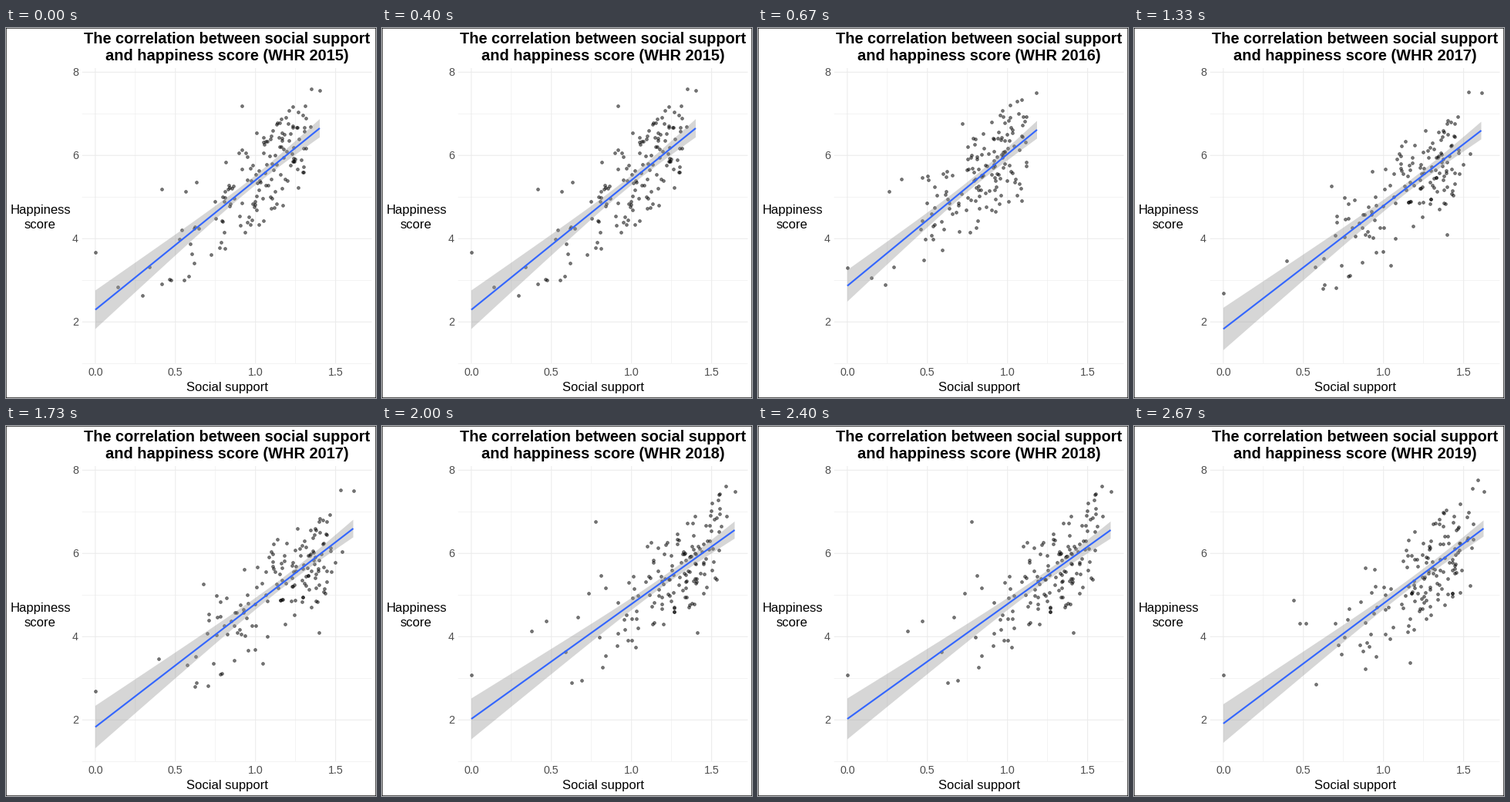
A matplotlib script for the animation above (3330 ms loop, 480x480 px).

```python
import numpy as np
import matplotlib.pyplot as plt
from matplotlib.animation import FuncAnimation

SIZE, DPI = 480, 100
PT = 72 / DPI                       # points per pixel
LOOP, TICK = 3330, 10               # milliseconds
CHANGES = (670, 1330, 2000, 2670)   # when the next year appears
LEFT, RIGHT, TOP, BOTTOM = 98.8, 474.5, 52, 435
X0, UNIT_X = 115.9, 207.8           # zero support, pixels per unit
Y8, UNIT_Y = 57.3, 54               # score eight, pixels per point
COUNT = 156                         # countries per year

plt.rcParams["font.family"] = "Liberation Sans"


class Year:
    """Scatter, regression line and confidence band of one year, in pixels."""

    def __init__(self, label, end, line, mean, edge, marks):
        self.label, self.end, self.line = label, end, line
        self.mean, self.edge = mean, edge
        self.points = np.vstack([marks, self.cloud(COUNT - len(marks))])

    def fit(self, x):
        return np.interp(x, (X0, self.end), self.line)

    def cloud(self, count):
        """Countries crowd towards high support and thin out to the left."""
        rng = np.random.default_rng(self.label)
        span = self.end - X0
        high = X0 + 0.97 * span
        x = high - rng.gamma(2, (high - self.mean) / 2, count)
        x = np.maximum(x, X0 + span * rng.uniform(0.2, 0.6, count))
        spread = np.clip(rng.normal(0, 1, count), -1.6, 1.6)
        spread += rng.uniform(-0.15, 0.15, count)
        return np.column_stack([x, self.fit(x) + 36 * spread])

    def ribbon(self):
        narrow = 6.4
        slope2 = (self.edge**2 - narrow**2) / (self.mean - X0) ** 2
        x = np.linspace(X0, self.end, 80)
        half = np.sqrt(narrow**2 + slope2 * (x - self.mean) ** 2)
        y = self.fit(x)
        return np.vstack([np.column_stack([x, y - half]),
                          np.column_stack([x, y + half])[::-1]])


# Only the countries that stand apart are placed by hand.
YEARS = [
    Year(2015, 407, (365.5, 130), 322, 25,
         [(116, 290.5), (145, 336), (202, 209), (202, 332), (214, 327),
          (306, 101), (396, 79), (407, 81)]),
    Year(2016, 362, (334.5, 132), 281, 20.5,
         [(116, 311), (147, 323.5), (165, 332.5), (170, 212), (186, 196),
          (265, 124), (342, 224), (361, 84)]),
    Year(2017, 450.5, (390.5, 133), 363, 27.5,
         [(116, 344), (198, 302), (247, 332.5), (256, 205), (333, 308),
          (406, 268), (434, 83), (451, 84)]),
    Year(2018, 457.5, (380, 135), 368, 26.5,
         [(116, 323), (194, 266), (246, 332.5), (277, 124), (284, 194),
          (409, 268), (446, 78), (457.5, 85)]),
    Year(2019, 453.5, (386, 133), 367, 25,
         [(116, 323), (207, 226), (236, 335), (300, 184), (300, 315),
          (358, 307), (446, 70), (453.5, 85)]),
]

fig = plt.figure(figsize=(SIZE / DPI, SIZE / DPI), dpi=DPI, facecolor="white")
ax = fig.add_axes([0, 0, 1, 1])
ax.set(xlim=(0, SIZE), ylim=(SIZE, 0))
ax.axis("off")


def text(x, y, string, px, ha="center", **style):
    return ax.text(x, y, string, fontsize=px * PT, ha=ha, va="baseline", **style)


def grid(xs, ys, width):
    style = dict(color="#EBEBEB", lw=width * PT, zorder=1,
                 solid_capstyle="butt", snap=False)
    for x in xs:
        ax.plot([x, x], [TOP, BOTTOM], **style)
    for y in ys:
        ax.plot([LEFT, RIGHT], [y, y], **style)


ax.add_patch(plt.Rectangle((0, 0), SIZE, SIZE, fill=False, ec="black",
                           lw=1.3 * PT, snap=False))

major_x = X0 + UNIT_X / 2 * np.arange(4)
major_y = Y8 + 2 * UNIT_Y * np.arange(4)
grid(major_x[:3] + UNIT_X / 4, major_y + UNIT_Y, 0.55)
grid(major_x, major_y, 1.07)

for i, (x, y) in enumerate(zip(major_x, major_y)):
    text(x, 451, f"{i / 2:.1f}", 14.2, color="#4D4D4D")
    text(94, y + 5, str(8 - 2 * i), 14.2, ha="right", color="#4D4D4D")

text(286.5, 471, "Social support", 16.6)
text(44.5, 241, "Happiness", 16.6)
text(44.5, 260, "score", 16.6)
text(286.5, 20, "The correlation between social support", 20, weight="bold")
title = text(286.5, 42, "", 20, weight="bold")

dots = ax.scatter([], [], s=(3.7 * PT) ** 2, facecolor="black",
                  edgecolor="black", linewidth=0.9 * PT, alpha=0.5,
                  zorder=2, snap=False)
ribbon = plt.Polygon([(0, 0), (0, 0)], fc="#999999", alpha=0.4, lw=0, zorder=3)
ax.add_patch(ribbon)
trend, = ax.plot([], [], color="#3366FF", lw=2.13 * PT, zorder=4,
                 solid_capstyle="butt")


def draw(i):
    year = YEARS[np.searchsorted(CHANGES, i * TICK, side="right")]
    title.set_text(f"and happiness score (WHR {year.label})")
    dots.set_offsets(year.points)
    ribbon.set_xy(year.ribbon())
    trend.set_data((X0, year.end), year.line)
    return title, dots, ribbon, trend


anim = FuncAnimation(fig, draw, frames=LOOP // TICK, interval=TICK,
                     repeat=True, repeat_delay=0)
plt.show()
```
